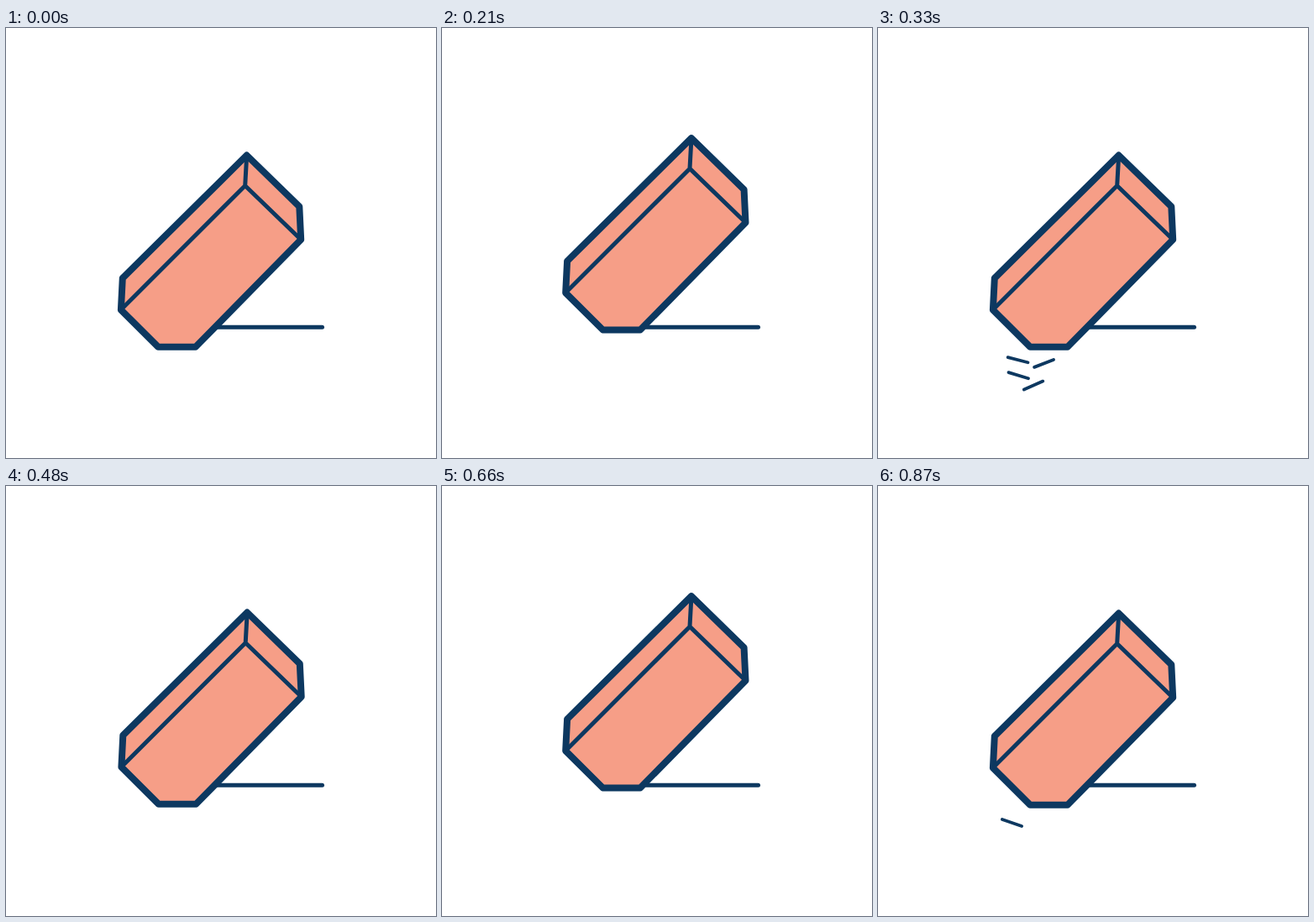
An HTML page for the animation above (0.9 s loop, 512 by 512 pixels).

```html
<!DOCTYPE html>
<html lang="en">
<head>
<meta charset="utf-8">
<title>Eraser</title>
<style>
  html, body { margin: 0; width: 100%; height: 100%; overflow: hidden; background: #fff; }
  svg { display: block; width: 100vw; height: 100vh; }
  path { fill: none; stroke: #0d3860; stroke-width: 5; stroke-linecap: round; stroke-linejoin: round; }
  #eraser .body { fill: #f69e87; stroke-width: 8; }
  #crumbs path { stroke-width: 3.8; }
</style>
</head>
<body>
<svg viewBox="0 0 512 512">
  <path d="M243 356.3H376.5"/>
  <g id="crumbs"></g>
  <g id="eraser">
    <path class="body" d="M286.6 151.5 349.3 212.6 351.2 252 225.7 379.8H181.3L136.9 335.6 138.8 297.8Z"/>
    <path d="M286.6 153 284.7 187.7 351.2 252M284.7 187.7 138.4 334"/>
  </g>
</svg>
<script>
  const STEP = 30, CYCLE = 15;      // ms per step, steps per rub
  const UP = 7, DOWN = 11, FALL = 8; // steps at which the phases turn
  const LIFT = [10.3, -20.3];

  // from and to: x, y; turn in degrees; time = fall length, end = step it vanishes
  const crumbs = [
    { from: [187.8, 377.8], to: [159.5, 401], turn: 19, time: 4.5, end: 15 },
    { from: [212.5, 377.3], to: [194.1, 404.6], turn: -26, time: 4.2, end: 13 },
    { from: [188.2, 382.6], to: [162.4, 420.9], turn: 21, time: 4.2, end: 14 },
    { from: [200, 389], to: [181.6, 434], turn: -29, time: 4.2, end: 13 }
  ];

  const eraser = document.getElementById('eraser');
  const group = document.getElementById('crumbs');
  for (const c of crumbs) {
    c.el = document.createElementNS('http://www.w3.org/2000/svg', 'path');
    c.el.setAttribute('d', 'M-12.3 0H12.3');
    group.append(c.el);
  }

  const ease = p => 0.5 - 0.5 * Math.cos(Math.PI * Math.min(1, Math.max(0, p)));
  const mix = (a, b, p) => a + (b - a) * p;

  function draw() {
    const step = Math.floor((performance.now() + 0.01) / STEP) % CYCLE;

    const lift = step < UP ? ease(step / UP) : 1 - ease((step - UP) / (DOWN - UP));
    eraser.setAttribute('transform', `translate(${LIFT[0] * lift} ${LIFT[1] * lift})`);

    for (const { el, from, to, turn, time, end } of crumbs) {
      const p = ease((step - FALL) / time);
      const x = mix(from[0], to[0], p), y = mix(from[1], to[1], p);
      el.setAttribute('transform', `translate(${x} ${y}) rotate(${turn * p})`);
      el.style.display = step >= FALL && step < end ? '' : 'none';
    }
    requestAnimationFrame(draw);
  }
  draw();
</script>
</body>
</html>
```
